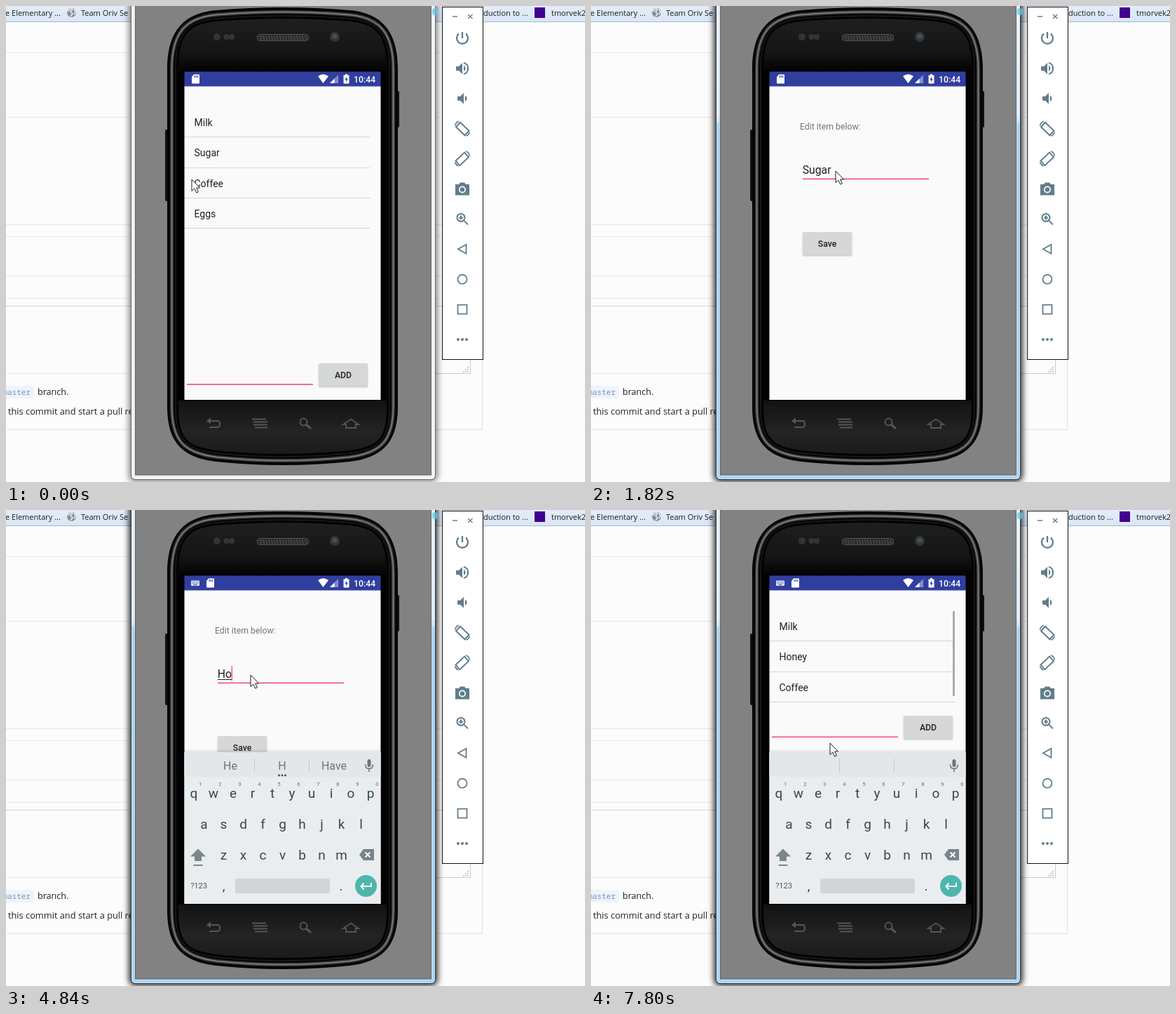
These frames come from a looping animation (826 by 678 pixels, 8000 ms). An HTML page:

```html
<!DOCTYPE html>
<html lang="en">
<head>
<meta charset="utf-8">
<title>Shopping list on a phone emulator</title>
<style>
html, body { margin: 0; width: 100%; height: 100%; overflow: hidden; background: #fcfcfc; }
svg { display: block; }
text { white-space: pre; }
.page { font-family: "Open Sans", "Noto Sans", sans-serif; }
.app { font-family: Roboto, sans-serif; }
.mid { text-anchor: middle; }
.medium { font-weight: 500; }
.icon { fill: none; stroke: #607d8b; stroke-width: 2; }
.nav { fill: none; stroke: #555; stroke-width: 2; }
</style>
</head>
<body>
<svg id="stage" width="826" height="678" viewBox="0 0 826 678"></svg>
<script>
const LOOP = 8000;

const STEPS = [0, 150, 290, 430, 570, 710, 850, 1010, 1130, 1280, 1410, 1550, 1690, 1820,
  2090, 2220, 2350, 2480, 2940, 3070, 3210, 3490, 3640, 3790, 3920,
  4470, 4620, 4770, 4920, 5070, 5230, 5380, 5530, 5650,
  6050, 6190, 6330, 6470, 6610, 6750, 6890, 7160, 7430, 7620, 7800];

// time, x, y
const POINTER = [[0, 265, 247], [710, 279, 209], [1130, 279, 209], [1690, 349, 235],
  [6050, 349, 235], [6890, 341, 332]];

// time, field text, keyboard suggestions
const EDITS = [
  [0, "Sugar", "||"], [2480, "Sugar", "Sugar's|Sugar|Sugars"],
  [2940, "Suga", "Sugar's|Sugar|Sugars"], [3070, "Sug", "Sugar|Suga|Sugars"],
  [3210, "Sug", "Suggest|Sug|Sugar"], [3490, "Su", "Such|Su|Sure"],
  [3640, "S", "Such|Su|Sure"], [3790, "S", "So|S|She"], [3920, "", "I|The|I'm"],
  [4470, "H", "I|The|I'm"], [4620, "H", "He|H|Have"], [4770, "Ho", "He|H|Have"],
  [4920, "Hon", "How|Ho|Home"], [5070, "Hon", "Honor|Hon|Home"],
  [5230, "Hone", "Honor|Hon|Home"], [5380, "Hone", "Honest|Hone|Honor"],
  [5530, "Honey", "Honest|Hone|Honor"], [5650, "Honey", "Hone...oon|Honey|Hone...omb"],
  [7430, "Honey", "||"]];

const rect = (x, y, w, h, fill, more = "") =>
  `<rect x="${x}" y="${y}" width="${w}" height="${h}" fill="${fill}" ${more}/>`;
const circle = (x, y, r, fill, more = "") =>
  `<circle cx="${x}" cy="${y}" r="${r}" fill="${fill}" ${more}/>`;
const path = (d, more = "") => `<path d="${d}" ${more}/>`;
const text = (x, y, size, fill, words, more = "") =>
  `<text x="${x}" y="${y}" font-size="${size}" fill="${fill}" ${more}>${words}</text>`;
const at = (x, y, body, more = "") => `<g transform="translate(${x} ${y})" ${more}>${body}</g>`;

function gradient(id, ...stops) {
  const list = stops.map(([o, c]) => `<stop offset="${o}" stop-color="${c}"/>`).join("");
  return `<linearGradient id="${id}" x1="0" y1="0" x2="0" y2="1">${list}</linearGradient>`;
}

// Phone outline, shrunk by i pixels
function phone(i) {
  const l = 230 + i, r = 559 - i, cl = 250 + i * .7, cr = 539 - i * .7;
  return `M${l} 90C${l} 40 ${cl} ${10 + i} 300 ${6 + i}Q395 ${i - 2} 490 ${6 + i}` +
    `C${cr} ${10 + i} ${r} 40 ${r} 90V570C${r} 620 ${cr} ${643 - i} 490 ${649 - i}` +
    `Q395 ${659 - i} 300 ${649 - i}C${cl} ${643 - i} ${l} 620 ${l} 570Z`;
}

function browserPage() {
  const rules = [66, 158, 311, 328, 384, 416, 427, 523]
    .map(y => rect(0, y, 622, 1, y === 427 ? "#d5d5d5" : "#e6e6e6")).join("");
  const grip = [[658, 515], [655, 518], [658, 518], [652, 521], [655, 521], [658, 521]]
    .map(([x, y]) => rect(x, y - 1, 1.5, 1.5, "#aaa")).join("");
  return rect(0, 0, 826, 678, "#fcfcfc") + rules +
    rect(0, 603, 680, 1, "#e0e0e0") + rect(679, 500, 1, 103, "#e0e0e0") +
    rect(613, 523, 50, 1, "#ccc") + rect(662, 500, 1, 23, "#ccc") + grip +
    rect(0, 0, 826, 22, "url(#bar)") + rect(0, 22, 826, 1, "#a9b7ca") +
    `<g class="page">` +
    text(-1, 14, 11, "#1c1c1c", "e Elementary ...") +
    text(107, 14, 11, "#1c1c1c", "Team Oriv Se") +
    text(681, 14, 11, "#1c1c1c", "duction to ...") +
    text(778, 14, 11, "#1c1c1c", "tmorvek20") +
    rect(-4, 541, 44, 18, "#edf4fb", `rx="3"`) +
    text(-4.6, 554, 11, "#7894b4", "master", `style="font-family:'Noto Sans Mono',monospace"`) +
    text(45, 554, 12.6, "#222", "branch.") +
    text(3, 582, 12.8, "#222", "this commit and start a pull re") + `</g>` +
    circle(93.5, 9.5, 6.5, "#8b8f94") +
    path("M88 8q5-6 7-3l-3 3 3 3-3 4M97 5l2 4-2 3", `fill="none" stroke="#eef1f5" stroke-width="1.5"`) +
    rect(754, 2, 15, 15, "#400090");
}

function emulatorFrame() {
  const outer = "M178.5-20V668Q178.5 674.5 185 674.5H606Q612.5 674.5 612.5 668V-20Z";
  return path(outer, `id="shade" fill="#000" stroke="#000" stroke-width="7" filter="url(#blur)"`) +
    path(outer, `id="glass"`) +
    path("M180-20V667Q180 673 186 673H605Q611 673 611 667V-20", `fill="none" stroke="#fff" stroke-opacity=".8"`) +
    `<g id="glow">` + path("M181 166V667Q181 672 186 672H605Q610 672 610 667V166", `fill="none" stroke="#8fd0f6" stroke-width="1.5"`) + `</g>` +
    rect(184.5, -2, 422, 670, "#828282", `stroke="#5f666c"`) +
    rect(608, 3, 8, 10, "#5cc8e8", `rx="4" opacity=".75"`);
}

function phoneBody() {
  const ring = (i, color, w) => path(phone(i), `fill="none" stroke="${color}" stroke-width="${w}"`);
  let mesh = "";
  for (let x = 362; x < 430; x += 4) mesh += rect(x, 43, 2, 1.5, "#5a5a5a") + rect(x + 1, 46, 2, 1.5, "#5a5a5a");
  return rect(227, 176, 5, 102, "#111", `rx="2"`) + rect(557, 121, 4, 52, "#111", `rx="2"`) +
    path(phone(0), `fill="#050505"`) + ring(6.5, "#3c3c3c", 5) + ring(6.5, "#858585", 1.4) +
    ring(12, "#262626", 1) + path(phone(13), `fill="#020202"`) +
    `<g clip-path="url(#face)">` + rect(240, 0, 310, 94, "url(#brow)") +
    rect(240, 562, 310, 90, "url(#chin)") + `</g>` +
    rect(358.5, 40.5, 73, 9, "#2a2a2a", `rx="4" stroke="#585858"`) + mesh +
    circle(301, 44, 5, "#373333") + circle(314.5, 44, 4, "#34343a") + circle(322, 44, 4, "#34343a") +
    circle(469, 44, 7, "#30363a") + circle(469, 43, 3.5, "#465158") +
    `<g class="nav">` +
    path("M292 591H302Q305 591 305 595.500Q305 600 301 600H290") +
    path("M292 586.500L286 591L292 595.500Z", `fill="#555" stroke="none"`) +
    path("M351 588.500H371M353 592.500H373M353 596.500H373M355 600.500H373") +
    circle(424.5, 592.5, 5, "none") + path("M428 596L435 602", `stroke-width="3"`) +
    path("M481 596L492 588.500L503 596H499V601H485V596Z", `stroke-width="1.800"`) + `</g>`;
}

const sdCard = `<path d="M3 0H10Q11 0 11 1V12Q11 13 10 13H1Q0 13 0 12V3.500Z" fill="#fff"/>` +
  [3.5, 5.8, 8].map(x => rect(x, 1.6, 1.2, 2.8, "#303f9f")).join("");

function statusBar() {
  let keys = rect(0, 0, 12, 7.5, "#fff", `rx="1" opacity=".85"`);
  for (let x = 1.5; x < 11; x += 2) keys += rect(x, 1.5, 1, 1, "#303f9f") + rect(x, 3.5, 1, 1, "#303f9f");
  keys += rect(3.5, 5.4, 5, 1, "#303f9f");
  return rect(254, 93, 282, 21.5, "#303f9f") +
    at(264, 100.5, keys, `id="imeIcon"`) + `<g id="sd">${sdCard}</g>` +
    path("M445 100Q452.500 94.500 460 100L452.500 110Z", `fill="#fff"`) +
    path("M474 98V110H462Z", `fill="#fff" opacity=".4"`) + path("M468.500 103.500V110H462Z", `fill="#fff"`) +
    rect(481.5, 98.5, 8, 12, "#fff", `rx=".8"`) + rect(484, 97, 3, 2, "#fff") +
    path("M486 100.500L483.500 105.200H485.200V108.500L487.700 103.800H486Z", `fill="#303f9f"`) +
    text(496, 109, 12.25, "#fff", "10:44", `class="medium"`);
}

function button(x, y, label, id) {
  return rect(x, y + 1, 70, 33, "#000", `rx="1.5" opacity=".22" filter="url(#soft)"`) +
    rect(x, y, 70, 32.5, "#d6d7d7", `rx="1.5" id="${id}"`) +
    text(x + 35, y + 20.5, 12.25, "#222", label, `class="mid medium"`);
}

function listScreen() {
  const rows = ["Milk", "Sugar", "Coffee", "Eggs"].map((name, i) => {
    const y = 143.7 + i * 43.3;
    return (i === 1 ? rect(255, 188, 264, 42, "#f2f2f2", `id="press"`) : "") +
      text(268.5, y + 27.3, 14, "#212121", name, `id="row${i}"`) +
      rect(255, Math.round(y + 42.6), 264, 1, "#d4d4d4");
  }).join("");
  return rect(254, 114, 282, 448, "#fafafa") +
    `<g id="rows">${rows}</g>` + rect(516, 144, 3, 121, "#aaa", `id="scrollbar"`) +
    `<g id="entry">` + rect(258, 538, 180, 2, "#f5689a") + button(446, 509, "ADD", "add") + `</g>`;
}

function editScreen() {
  return rect(254, 114, 282, 448, "#fafafa") +
    text(298, 175.5, 12.25, "#757575", "Edit item below:") +
    text(301.7, 239, 15.75, "#212121", "", `id="field"`) +
    rect(302, 241, 0, 1, "#222", `id="composing"`) +
    rect(302, 245.5, 180, 1.7, "#f5508a") +
    rect(311, 222, 1.3, 21, "#ff4081", `id="caret"`) +
    button(302, 322, "Save", "save");
}

function keyboard() {
  const row = (letters, x, y) => [...letters].map((c, i) =>
    text(x + 28 * i, y, 19, "#37474f", c, `class="mid"`)).join("");
  const digits = [..."1234567890"].map((c, i) =>
    text(277.5 + 28 * i, 393, 7.6, "#5f6d74", c, `class="mid"`)).join("");
  return rect(254, 342, 282, 4, "#000", `opacity=".07"`) +
    rect(254, 345, 282, 217, "#e9edf0") + rect(254, 345, 282, 35, "#e3e7ea") +
    rect(354, 354, 1, 20, "#c3c9cd") + rect(432, 354, 1, 20, "#c3c9cd") +
    [320, 394, 468].map((x, i) => text(x, 370, 16, "#6b767c", "", `class="mid" id="hint${i}"`)).join("") +
    `<g id="dots">` + [389.5, 394, 398.5].map(x => circle(x, 378, 1.4, "#37474f")).join("") + `</g>` +
    rect(515.5, 355, 5, 11, "#6b767c", `rx="2.5"`) +
    path("M512.500 362.500Q512.500 368.500 518 368.500Q523.500 368.500 523.500 362.500M518 368.500V373",
      `fill="none" stroke="#6b767c" stroke-width="1.6"`) +
    digits + row("qwertyuiop", 268, 409.5) + row("asdfghjkl", 282.5, 454) + row("zxcvbnm", 310.5, 498) +
    path("M274 482.500L285 493.500H279V500H269V493.500H263Z", `fill="#7b868b"`) +
    rect(267.5, 505, 13, 2, "#7b868b") +
    path("M510 483H525V499H510L504 491Z", `fill="#78848a"`) +
    path("M512.500 487.500L519.500 494.500M519.500 487.500L512.500 494.500", `stroke="#fff" stroke-width="1.8"`) +
    text(275, 539, 11, "#4b5a61", "?123", `class="mid"`) +
    text(310.5, 542, 19, "#37474f", ",", `class="mid"`) + text(478, 542, 19, "#37474f", ".", `class="mid"`) +
    rect(327, 525, 135, 21, "#d0d5d8", `rx="3"`) + circle(513.5, 535.5, 15.5, "#4db6ac") +
    path("M521 531V536H506.500M510.500 531.500L506.500 536L510.500 540.500",
      `fill="none" stroke="#fff" stroke-width="2"`);
}

function toolbar() {
  const solid = `fill="#607d8b" stroke="none"`;
  const speaker = path("M-9-3H-5L0-8V8L-5 3H-9Z", solid) + path("M2-4.500Q7 0 2 4.500Z", solid);
  const rotate = path("M-3-9L9.500 3L3.500 9.500L-9-2.500Z") +
    path("M-10.500-4Q-9.500-9-5-10.500M10.500 5Q9 9 5.500 10.500", `stroke-width="1.600"`);
  const icons = [
    path("M0-9V0M-5-6.500A8 8 0 1 0 5-6.500", `stroke-width="2.300"`),
    speaker + path("M2-8A8.300 8.300 0 0 1 2 8"),
    at(2, 0, speaker),
    rotate,
    `<g transform="scale(-1 1)">${rotate}</g>`,
    path("M-10-6.500H-5L-3-9H3L5-6.500H10V9H-10Z", solid) + circle(0, 1, 5, "#fff", `stroke="none"`) +
      circle(0, 1, 3.3, "#607d8b", `stroke="none"`),
    circle(-2, -2, 5.5, "none") + path("M2 2L8 8M-5-2H1M-2-5V1"),
    path("M5.500-6.500V6.500L-6 0Z", `stroke-width="1.800"`),
    circle(0, 0, 6.5, "none", `stroke-width="1.800"`),
    path("M-6.500-6.500H6.500V6.500H-6.500Z", `stroke-width="1.800"`),
    [-6, 0, 6].map(x => circle(x, 0, 2, "#607d8b", `stroke="none"`)).join("")
  ];
  return rect(622.5, 1.5, 58, 502, "#fff", `stroke="#111"`) +
    `<g class="icon">` + path("M637 15H644M659 12L665.500 18M665.500 12L659 18", `stroke-width="1.300"`) +
    icons.map((icon, i) => at(651, 46 + 42.9 * i, icon)).join("") + `</g>`;
}

const stage = document.getElementById("stage");
stage.innerHTML = `<defs>
  ${gradient("bar", [0, "#e4edf9"], [1, "#d9e6f6"])}
  ${gradient("brow", [0, "#222"], [.7, "#151515"], [1, "#020202"])}
  ${gradient("chin", [0, "#121212"], [.5, "#242424"], [1, "#161616"])}
  ${gradient("active", [0, "#e6f0fa"], [.25, "#dceafa"], [.28, "#b9d6f3"], [1, "#c0daf5"])}
  <clipPath id="face"><path d="${phone(16)}"/></clipPath>
  <clipPath id="screen"><rect x="254.5" y="93.500" width="280" height="467.500"/></clipPath>
  <clipPath id="shortList"><rect x="254" y="115" width="280" height="162"/></clipPath>
  <filter id="soft"><feGaussianBlur stdDeviation="1"/></filter>
  <filter id="blur" x="-10%" width="120%" y="-10%" height="120%"><feGaussianBlur stdDeviation="4.5"/></filter>
</defs>` + browserPage() + emulatorFrame() + phoneBody() +
  `<g class="app" clip-path="url(#screen)"><g id="list">${listScreen()}</g><g id="edit">${editScreen()}</g>` +
  `<g id="keyboard">${keyboard()}</g>${statusBar()}</g>` + toolbar() +
  path("M0 0V16.500L3.800 13L6.600 19L9.400 17.800L6.700 12H11.500Z", `id="pointer" fill="#fff" stroke="#1a1a2a"`);

const parts = {};
stage.querySelectorAll("[id]").forEach(el => parts[el.id] = el);

const set = (id, attrs) => {
  for (const name in attrs) parts[id].setAttribute(name, attrs[name]);
};
const show = (id, on) => set(id, { visibility: on ? "inherit" : "hidden" });
const move = (id, x, y) => set(id, { transform: `translate(${x} ${y})` });
const latest = (keys, t) => keys.filter(k => k[0] <= t).pop();

function pointerAt(t) {
  const a = latest(POINTER, t);
  const b = POINTER[POINTER.indexOf(a) + 1];
  if (!b) return a.slice(1);
  const p = (t - a[0]) / (b[0] - a[0]);
  const k = p * p * (3 - 2 * p);
  return [a[1] + (b[1] - a[1]) * k, a[2] + (b[2] - a[2]) * k];
}

function drawWindow(t) {
  const active = t >= 850;
  set("glass", { fill: active ? "url(#active)" : "#eff1f3", stroke: active ? "#2b3138" : "#666" });
  set("shade", { opacity: active ? .8 : .45 });
  show("glow", active);
}

function drawList(t) {
  const back = t >= 7430;
  show("list", t < 1280 || back);
  show("press", t >= 1010 && t < 1130);
  show("scrollbar", t >= 7620);
  parts.row1.textContent = back ? "Honey" : "Sugar";
  set("rows", { "clip-path": back ? "url(#shortList)" : "none" });
  move("entry", 0, back ? -215.7 : 0);
}

function drawEdit(t, word) {
  const leaving = t >= 7430;
  const typing = t >= 2350;
  show("edit", t >= 1130 && t < 7620);
  set("edit", { opacity: leaving ? .5 : 1 });
  move("edit", 0, t < 1280 || leaving ? 5 : 0);
  parts.field.textContent = word;
  const width = word ? parts.field.getComputedTextLength() : 0;
  set("composing", { width: typing ? width : 0 });
  set("caret", { x: 301.4 + width });
  show("caret", typing && t < 7160 && !(t >= 6050 && t < 6610));
  set("save", { fill: t >= 7160 ? "#c2c3c3" : "#d6d7d7" });
}

function drawKeyboard(t, hints) {
  const up = t >= 2220;
  show("keyboard", t >= 2090);
  move("keyboard", 0, t < 2220 ? 130 : t < 2350 ? 28 : 0);
  show("imeIcon", up);
  move("sd", up ? 286 : 265, 97.5);
  show("dots", t >= 2350 && t < 7430);
  hints.split("|").forEach((word, i) => {
    const tight = word.includes("...");
    const bold = word === "Honey" && i === 1;
    parts["hint" + i].textContent = word;
    set("hint" + i, {
      "font-size": tight ? 14 : 16, "letter-spacing": tight ? -.9 : 0,
      "font-weight": bold ? 700 : 400, fill: bold ? "#4f5c62" : "#6b767c"
    });
  });
}

function render(time) {
  const t = STEPS.filter(s => s <= time).pop();
  const [, word, hints] = latest(EDITS, t);
  drawWindow(t);
  drawList(t);
  drawEdit(t, word);
  drawKeyboard(t, hints);
  move("pointer", ...pointerAt(t));
}

const start = performance.now();
function tick() {
  render((performance.now() - start) % LOOP);
  requestAnimationFrame(tick);
}
tick();
</script>
</body>
</html>
```
